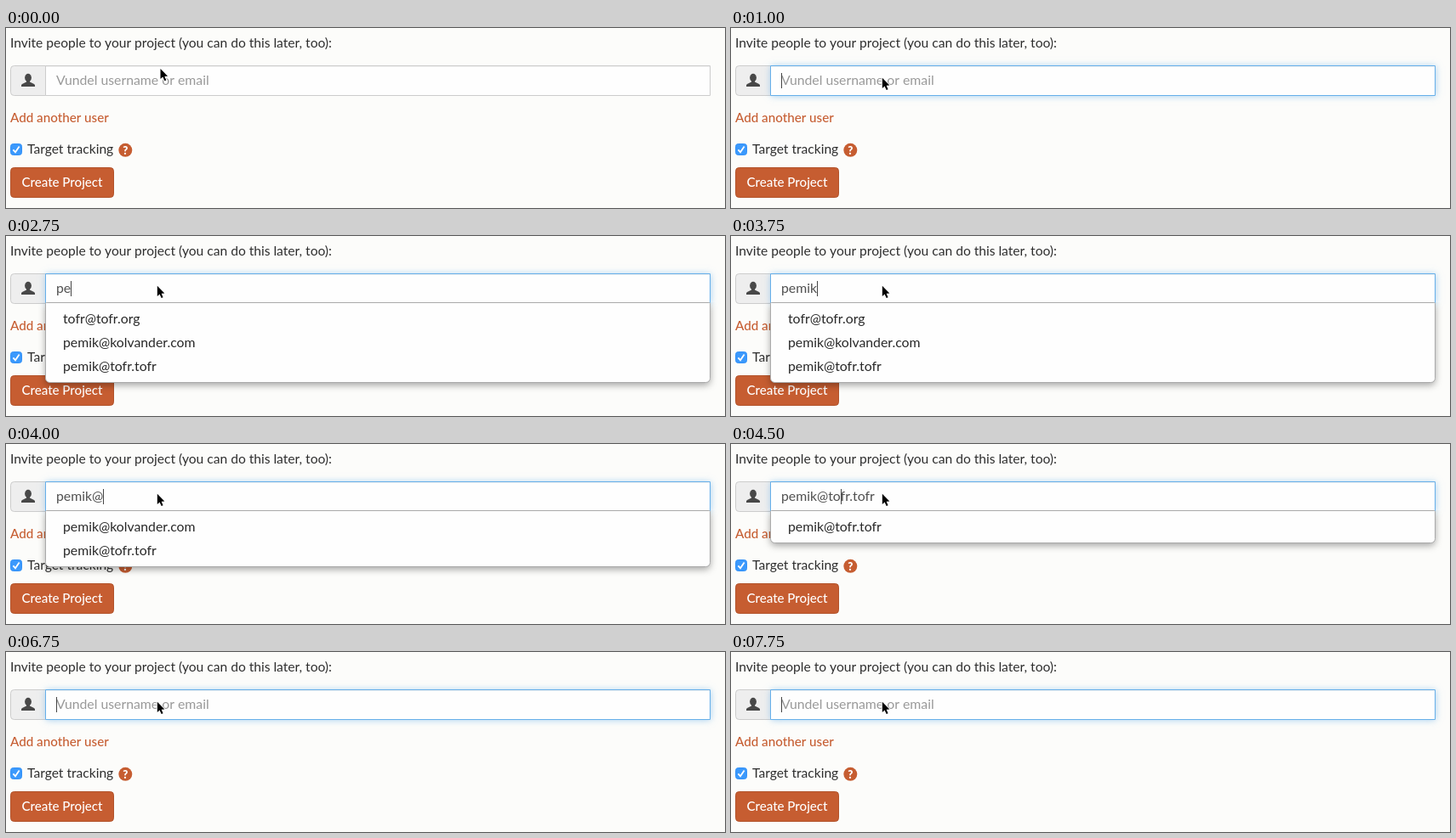
An HTML page with a canvas that plays this animation: 845 by 212 pixels, repeating every 8 s.

```html
<!DOCTYPE html>
<html lang="en">
<head>
<meta charset="utf-8">
<title>Invite people</title>
<style>
  html, body { margin: 0; width: 845px; height: 212px; overflow: hidden; background: #fcfcfa; }
  canvas { display: block; }
</style>
</head>
<body>
<canvas id="stage" width="845" height="212"></canvas>
<script>
const ctx = document.getElementById("stage").getContext("2d");
const LOOP = 8000;
const SIZE = 15.8;
const ORANGE = "#c65d31";
const FIELD = { x: 46, y: 44, w: 782, h: 36 };
const TEXT_X = 59;
const EMAILS = ["tofr@tofr.org", "pemik@kolvander.com", "pemik@tofr.tofr"];
const FULL = EMAILS[2];

// Each step changes part of the state and holds until the next one.
const STEPS = [
  [0, { mouse: [181.5, 48], focus: false, caret: false, value: "", pos: 0, items: [], selected: false }],
  [250, { mouse: [179.5, 51.2] }],
  [500, { mouse: [177.8, 58.8] }],
  [1000, { focus: true, caret: true }],
  [1500, { value: "p", pos: 1, items: EMAILS }],
  [1750, { value: "pe", pos: 2 }],
  [2250, { caret: false }],
  [2750, { caret: true }],
  [3250, { value: "pemi", pos: 4 }],
  [3750, { value: "pemik", pos: 5 }],
  [4000, { value: "pemik@", pos: 6, items: EMAILS.slice(1) }],
  [4500, { value: FULL, pos: 8, items: [FULL] }],
  [5000, { caret: false }],
  [5500, { caret: true }],
  [6000, { caret: false, selected: true }],
  [6750, { value: "", pos: 0, items: [], selected: false, caret: true }],
  [7250, { caret: false }],
  [7750, { caret: true }]
];

function stateAt(time) {
  const state = {};
  for (const [start, change] of STEPS) {
    if (start <= time) Object.assign(state, change);
  }
  return state;
}

function setFont(size = SIZE, weight = 400) {
  ctx.font = `${weight} ${size}px Lato, "Open Sans", sans-serif`;
}

function label(text, x, y, color, size, weight) {
  setFont(size, weight);
  ctx.fillStyle = color;
  ctx.fillText(text, x, y);
}

function box(x, y, w, h, radius, fill, line) {
  ctx.beginPath();
  ctx.roundRect(x + 0.5, y + 0.5, w - 1, h - 1, radius);
  ctx.fillStyle = fill;
  ctx.fill();
  if (line) {
    ctx.shadowColor = "transparent";
    ctx.strokeStyle = line;
    ctx.lineWidth = 1;
    ctx.stroke();
  }
}

function shadowed(color, blur, dy, draw) {
  ctx.save();
  ctx.shadowColor = color;
  ctx.shadowBlur = blur;
  ctx.shadowOffsetY = dy;
  draw();
  ctx.restore();
}

function userIcon() {
  ctx.fillStyle = "#484848";
  ctx.beginPath();
  ctx.ellipse(26, 58.6, 3.9, 4.9, 0, 0, Math.PI * 2);
  ctx.fill();
  ctx.fillRect(24, 61, 4, 4);
  ctx.beginPath();
  ctx.moveTo(18, 69);
  ctx.lineTo(18, 67.4);
  ctx.quadraticCurveTo(18.2, 66.2, 20, 65.5);
  ctx.lineTo(24, 63.6);
  ctx.lineTo(28, 63.6);
  ctx.lineTo(32, 65.5);
  ctx.quadraticCurveTo(33.8, 66.2, 34, 67.4);
  ctx.lineTo(34, 69);
  ctx.fill();
}

function page() {
  ctx.fillStyle = "#fcfcfa";
  ctx.fillRect(0, 0, 845, 212);
  label("Invite people to your project (you can do this later, too):", 5, 23, "#2e2e2e", 15.58);
  label("Add another user", 5, 111, ORANGE, 15.2, 500);

  box(5, 136, 14, 14, 3, "#3b99fc", "#3391f8");
  ctx.strokeStyle = "#fff";
  ctx.lineWidth = 1.8;
  ctx.beginPath();
  ctx.moveTo(8.4, 143.4);
  ctx.lineTo(11, 146.3);
  ctx.lineTo(15.6, 139.4);
  ctx.stroke();
  label("Target tracking", 25, 148, "#2e2e2e", 15.6);

  ctx.fillStyle = ORANGE;
  ctx.beginPath();
  ctx.arc(140.3, 143.8, 8, 0, Math.PI * 2);
  ctx.fill();
  ctx.textAlign = "center";
  label("?", 140.3, 148.5, "#fff", 13, 900);
  box(5, 164, 122, 36, 4, ORANGE, "#b2532b");
  label("Create Project", 66, 187, "#fff", 15.1, 500);
  ctx.textAlign = "left";

  box(5, 44, 42, 36, [4, 0, 0, 4], "#eee", "#ccc");
  userIcon();
}

function field(s) {
  const { x, y, w, h } = FIELD;
  const drawBox = () => box(x, y, w, h, 0, "#fefefe", s.focus ? "#66afe9" : "#ccc");
  if (s.focus) shadowed("rgba(102,175,233,.6)", 8, 0, drawBox);
  else drawBox();
  ctx.fillStyle = "rgba(0,0,0,.05)";
  ctx.fillRect(x + 1, y + 1, w - 2, 1);

  setFont();
  const caretX = Math.round(TEXT_X + ctx.measureText(s.value.slice(0, s.pos)).width);
  if (s.selected) {
    ctx.fillStyle = "#b0d5fb";
    ctx.fillRect(TEXT_X, 53, caretX - TEXT_X, 18);
  }
  if (s.value) label(s.value, TEXT_X, 67, "#505050");
  else label("Vundel username or email", TEXT_X, 67, "#999");
  if (s.caret) {
    ctx.fillStyle = "#444";
    ctx.fillRect(caretX, 53, 1, 18);
  }
}

function menu(items) {
  if (!items.length) return;
  const h = 11 + 28 * items.length;
  ctx.save();
  ctx.beginPath();
  ctx.rect(0, 78, 845, 134);
  ctx.clip();
  shadowed("rgba(0,0,0,.36)", 8, 3, () => box(46, 78, 782, h, [1, 1, 5, 5], "#fefefe", "#aaa"));
  ctx.restore();
  items.forEach((text, i) => label(text, 67, 103 + 28 * i, "#282828"));
}

function pointer([x, y]) {
  ctx.save();
  ctx.translate(x, y);
  ctx.scale(0.93, 0.93);
  ctx.beginPath();
  ctx.moveTo(0, 0);
  ctx.lineTo(0, 13);
  ctx.lineTo(3, 10.3);
  ctx.lineTo(5.2, 15.3);
  ctx.lineTo(7.3, 14.4);
  ctx.lineTo(5.2, 9.6);
  ctx.lineTo(9.2, 9.4);
  ctx.closePath();
  ctx.lineWidth = 2;
  ctx.lineJoin = "round";
  ctx.strokeStyle = "#fff";
  ctx.stroke();
  ctx.fillStyle = "#000";
  ctx.fill();
  ctx.restore();
}

function draw() {
  const s = stateAt(performance.now() % LOOP);
  page();
  field(s);
  menu(s.items);
  pointer(s.mouse);
  requestAnimationFrame(draw);
}

draw();
</script>
</body>
</html>
```
